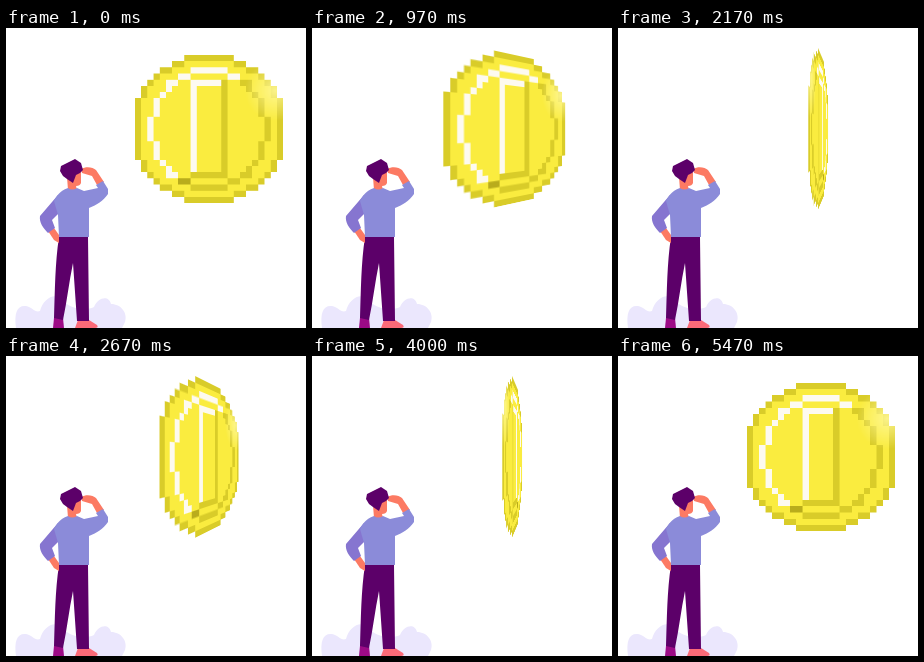
An HTML page with a canvas that plays this animation: 300x300 px, repeating every 5.51 s.

```html
<!DOCTYPE html>
<html lang="en">
<head>
<meta charset="utf-8">
<title>Watching a spinning coin</title>
<style>
html, body { margin: 0; width: 100%; height: 100%; overflow: hidden; background: #fff; }
svg { position: absolute; left: 0; top: 0; }
canvas { position: absolute; left: 129px; top: 27px; width: 148px; height: 148px; }
</style>
</head>
<body>
<svg width="300" height="300" viewBox="0 0 300 300">
  <path fill="#ebe7fd" d="M10 300C8 285 11 277 20 278C26 279 29 285 34 283C37 271 48 264 56 271C64 282 80 283 88 279C92 269 103 267 105 276C115 276 122 285 119 294L116 300Z"/>
  <path fill="#9c0a86" d="M48 290H57L58 300H47Z"/>
  <path fill="#fb6a78" d="M72 292H83L91 297Q93 300 89 300H69Z"/>
  <path fill="#5c0069" d="M53 209H82L83 293H71L67 235C63 254 61 273 57 292L48 290C49 262 49 235 53 209Z"/>
  <g fill="#fc7a63">
    <path d="M61 149L75 144V155Q74 158 70 158L71 162H62Z"/>
    <path d="M75 141C80 138 87 139 90 142L98 154L91 157L86 148L76 145Z"/>
    <path d="M42 203L48 200L53 207V215L48 212Z"/>
  </g>
  <path fill="#8675d0" d="M52 167L34 188C33 194 37 200 42 205L49 200L46 192L54 184Z"/>
  <path fill="#8b8bd9" d="M62 160C53 163 50 169 48 173L52 187L53 209H83V180C91 177 97 173 102 166V161L97 153L90 157L92 160L78 163L71 160Q66 163 62 160Z"/>
  <path fill="#5c0069" d="M55 138L69 131L75 135L77 142L74 145L70 147L67 155L61 151L57 148L54 143Z"/>
</svg>
<canvas id="coin" width="480" height="480"></canvas>
<script>
const coin = document.getElementById('coin');
const ctx = coin.getContext('2d');
const CELLS = 24, SIZE = 20;
const YELLOW = '#faec3f', DARK = '#d9cc29', OLIVE = '#b9ac1c', WHITE = '#fdfaf0';

// Cell centres are measured from the middle of the coin.
const inCoin = (x, y) => Math.hypot(x, y * 1.02) < 12.45;
const inRing = (x, y) => Math.hypot(x * 1.05, y) < 10.16;
const onEdge = (inside, x, y) => inside(x, y) &&
  !(inside(x - 1, y) && inside(x + 1, y) && inside(x, y - 1) && inside(x, y + 1));

function colour(x, y) {
  if (onEdge(inCoin, x, y)) return DARK;
  if (onEdge(inRing, x, y)) {
    if (y < -8 || x < 0 && y < 8) return WHITE;
    return x < -3 && y < 9 ? OLIVE : DARK;
  }
  if (Math.max(Math.abs(x) * 3, Math.abs(y)) === 7.5) {
    return x === 2.5 || y === 7.5 ? DARK : WHITE;
  }
  return YELLOW;
}

for (let row = 0; row < CELLS; row++) {
  for (let col = 0; col < CELLS; col++) {
    const x = col - CELLS / 2 + 0.5, y = row - CELLS / 2 + 0.5;
    if (!inCoin(x, y)) continue;
    ctx.fillStyle = colour(x, y);
    ctx.fillRect(col * SIZE, row * SIZE, SIZE, SIZE);
  }
}

// Glare on the upper right rim.
const glare = ctx.createRadialGradient(455, 115, 0, 455, 115, 100);
glare.addColorStop(0, 'rgba(255, 248, 150, .9)');
glare.addColorStop(1, 'rgba(255, 248, 150, 0)');
ctx.globalCompositeOperation = 'source-atop';
ctx.fillStyle = glare;
ctx.fillRect(0, 0, coin.width, coin.height);

// Cubic Bézier easing with control points (.32, 0) and (0, 1).
function ease(t) {
  let lo = 0, hi = 1;
  for (let i = 0; i < 20; i++) {
    const p = (lo + hi) / 2;
    if (0.96 * p * (1 - p) ** 2 + p ** 3 < t) lo = p; else hi = p;
  }
  return lo * lo * (3 - 2 * lo);
}

// Six poses a second, eleven to a turn, three turns to the loop.
const LOOP = 5510, POSE = 1000 / 6, LEAD = 40, POSES = 11;
const start = performance.now();

function draw(now) {
  const t = Math.max(0, now - start) % LOOP;
  const pose = Math.floor((t + LEAD) / POSE) % POSES;
  const angle = 360 * ease(pose / POSES);
  coin.style.transform = `perspective(255px) rotateY(${-angle}deg)`;
  requestAnimationFrame(draw);
}
draw(start);
</script>
</body>
</html>
```
